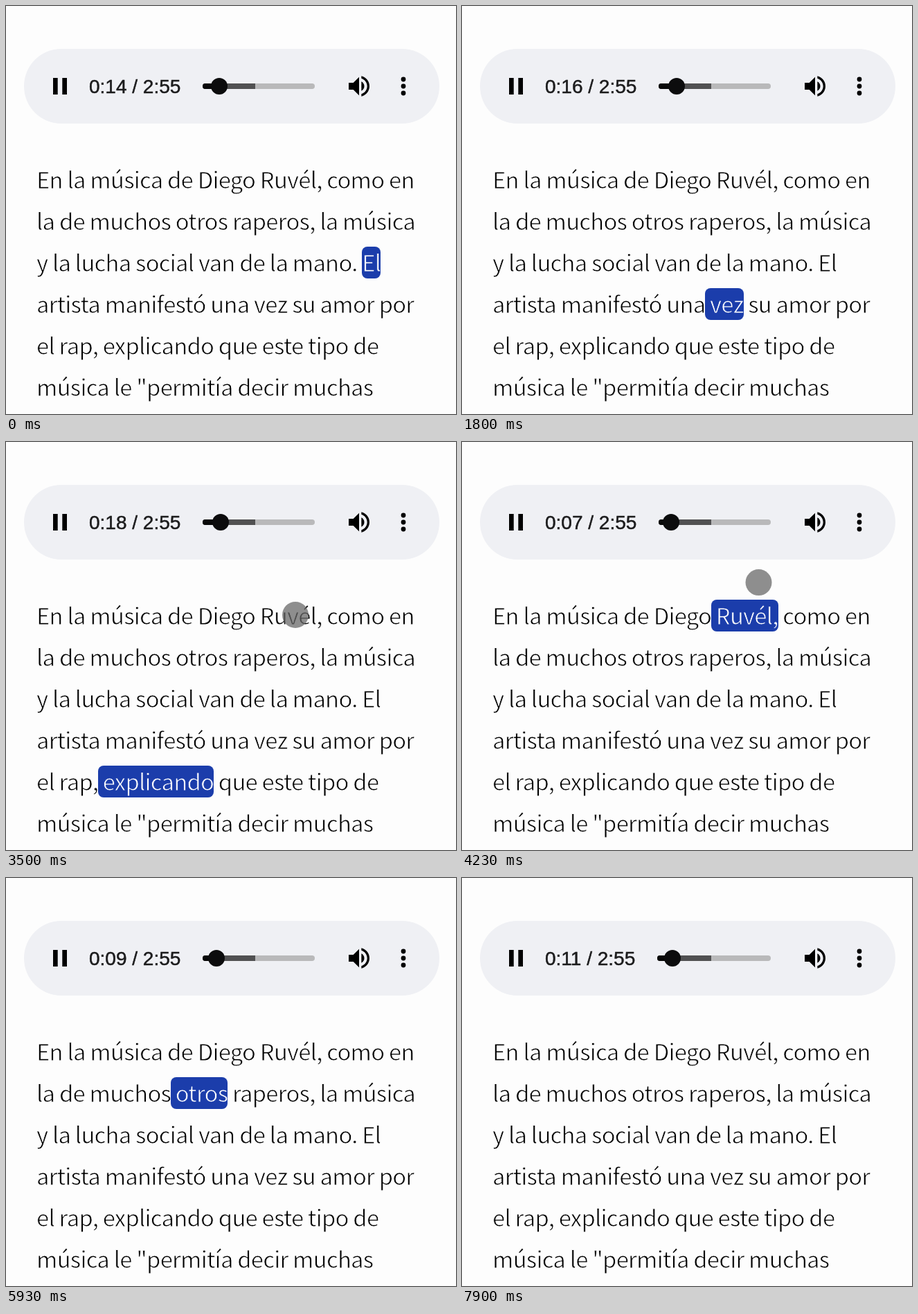
These frames come from a looping animation (650 px wide and 590 px high, 7.93 s). An HTML page with a canvas:

```html
<!DOCTYPE html>
<html lang="es">
<head>
<meta charset="utf-8">
<title>Audio con transcripción</title>
<style>
  html, body { margin: 0; width: 100%; height: 100%; overflow: hidden; background: #fdfdfd; }
  canvas { display: block; }
</style>
</head>
<body>
<canvas id="stage" width="650" height="590"></canvas>
<script>
const LOOP = 7930;
const SEEK = 3600;
const RESUME = 4200;
const DURATION = 175;
const MS_PER_LETTER = 100;

const PAPER = '#fdfdfd';
const BLUE = '#1b3dab';
const TEXT_FONT = '32.8px "Noto Sans CJK JP", "Noto Sans CJK SC", "Noto Sans CJK", sans-serif';
const CLOCK_FONT = '28px "Liberation Sans", Arial, sans-serif';
const LEFT = 44;
const LINE_HEIGHT = 60;

const LINES = [
  'En la música de Diego Ruvél, como en',
  'la de muchos otros raperos, la música',
  'y la lucha social van de la mano. El',
  'artista manifestó una vez su amor por',
  'el rap, explicando que este tipo de',
  'música le "permitía decir muchas'
];
const WORDS = LINES.flatMap((line, row) =>
  line.split(' ').map((text, index) => ({ text, row, index })));

// Word ranges read aloud; the first word is held for an extra pause
const PHRASES = [
  { start: 0, pause: 100, first: 23, last: 33 },
  { start: SEEK, pause: RESUME - SEEK, first: 5, last: 12 },
  { start: 7100, pause: 200, first: 13, last: 14 }
];

const POINTER = [
  { t: 2300, x: 672, y: 330 },
  { t: 2800, x: 472, y: 253 },
  { t: 3100, x: 418, y: 250 },
  { t: 3850, x: 418, y: 250 },
  { t: 4230, x: 428, y: 203 },
  { t: 4700, x: 672, y: 250 }
];

const VOLUME = new Path2D('M3 9v6h4l5 5V4L7 9H3zm13.5 3c0-1.77-1-3.3-2.5-4v8c1.5-.7 2.5-2.2 2.5-4z' +
  'M14 3.2v2.1c2.9.9 5 3.5 5 6.7s-2.1 5.8-5 6.7v2.1c4-.9 7-4.5 7-8.8s-3-7.9-7-8.8z');

const ctx = document.getElementById('stage').getContext('2d');
ctx.lineJoin = 'round';

function box(x, y, w, h, r, color) {
  ctx.fillStyle = color;
  ctx.beginPath();
  ctx.roundRect(x, y, w, h, r);
  ctx.fill();
}

function disc(x, y, r, color) {
  ctx.fillStyle = color;
  ctx.beginPath();
  ctx.arc(x, y, r, 0, 2 * Math.PI);
  ctx.fill();
}

// An outline in the text colour thickens the letters, one in the backdrop colour thins them
function label(text, x, y, color, outline, weight) {
  ctx.fillStyle = color;
  ctx.fillText(text, x, y);
  ctx.strokeStyle = outline;
  ctx.lineWidth = weight;
  ctx.strokeText(text, x, y);
}

function lightLine(row, color, backdrop) {
  label(LINES[row], LEFT, 264 + LINE_HEIGHT * row, color, backdrop, 0.85);
}

// Playback waits after the seek until the sound resumes
const audioTime = ms => ms < SEEK ? 14.5 + ms / 1000 : 7.43 + Math.max(0, ms - RESUME) / 1000;

function spokenWord(ms) {
  const { start, pause, first, last } = PHRASES.findLast(phrase => phrase.start <= ms);
  let end = start + pause;
  return WORDS.slice(first, last + 1).find(({ text }) => {
    end += MS_PER_LETTER * (text.length - 1);
    return ms < end;
  });
}

function drawPlayer(seconds) {
  box(26, 62, 600, 108, 54, '#eff0f4');
  for (const x of [68, 81.3]) box(x, 104, 6.7, 24, 0, '#000');
  for (const y of [106, 116, 126]) disc(574, y, 3.4, '#000');

  const clock = '0:' + String(Math.floor(seconds)).padStart(2, '0') + ' / 2:55';
  ctx.font = CLOCK_FONT;
  ctx.letterSpacing = '0px';
  label(clock, 120, 126, '#1c1c1d', '#1c1c1d', 0.5);

  const left = 2 * Math.round((152 + ctx.measureText(clock).width) / 2);
  const right = 446;
  const position = left + 11.7 + (right - left - 24) * seconds / DURATION;
  const knob = 2 * Math.ceil(position / 2);
  box(left, 112, right - left, 8, 4, '#b9b9ba');
  box(left, 112, 360 - left, 8, [4, 0, 0, 4], '#515152');
  box(left, 112, knob - left, 8, [4, 0, 0, 4], '#080808');
  disc(knob, 116, 12, '#0c0c0d');

  ctx.save();
  ctx.translate(490, 96);
  ctx.scale(5 / 3, 5 / 3);
  ctx.fillStyle = '#000';
  ctx.fill(VOLUME);
  ctx.restore();
}

function drawText(ms) {
  ctx.font = TEXT_FONT;
  ctx.letterSpacing = '-0.74px';
  LINES.forEach((line, row) => lightLine(row, '#000', PAPER));

  const word = spokenWord(ms);
  if (!word) return;
  const { row, index } = word;
  const words = LINES[row].split(' ');
  const startsSentence = index > 0 && words[index - 1].endsWith('.');
  const edge = text => Math.round(LEFT + ctx.measureText(text).width);
  const x = edge(words.slice(0, index).join(' ') + (startsSentence ? ' ' : ''));
  const end = edge(words.slice(0, index + 1).join(' '));

  ctx.save();
  box(x, 228 + LINE_HEIGHT * row, end - x, 46, 8, BLUE);
  ctx.clip();
  lightLine(row, '#fff', BLUE);
  ctx.restore();
}

function drawPointer(ms) {
  const next = POINTER.findIndex(point => point.t > ms);
  if (next < 1) return;
  const a = POINTER[next - 1];
  const b = POINTER[next];
  const p = (ms - a.t) / (b.t - a.t);
  disc(a.x + (b.x - a.x) * p, a.y + (b.y - a.y) * p, 19, 'rgba(102,102,102,.73)');
}

function frame() {
  const ms = performance.now() % LOOP;
  box(0, 0, 650, 590, 0, PAPER);
  drawPlayer(audioTime(ms));
  drawText(ms);
  drawPointer(ms);
  requestAnimationFrame(frame);
}
frame();
</script>
</body>
</html>
```
